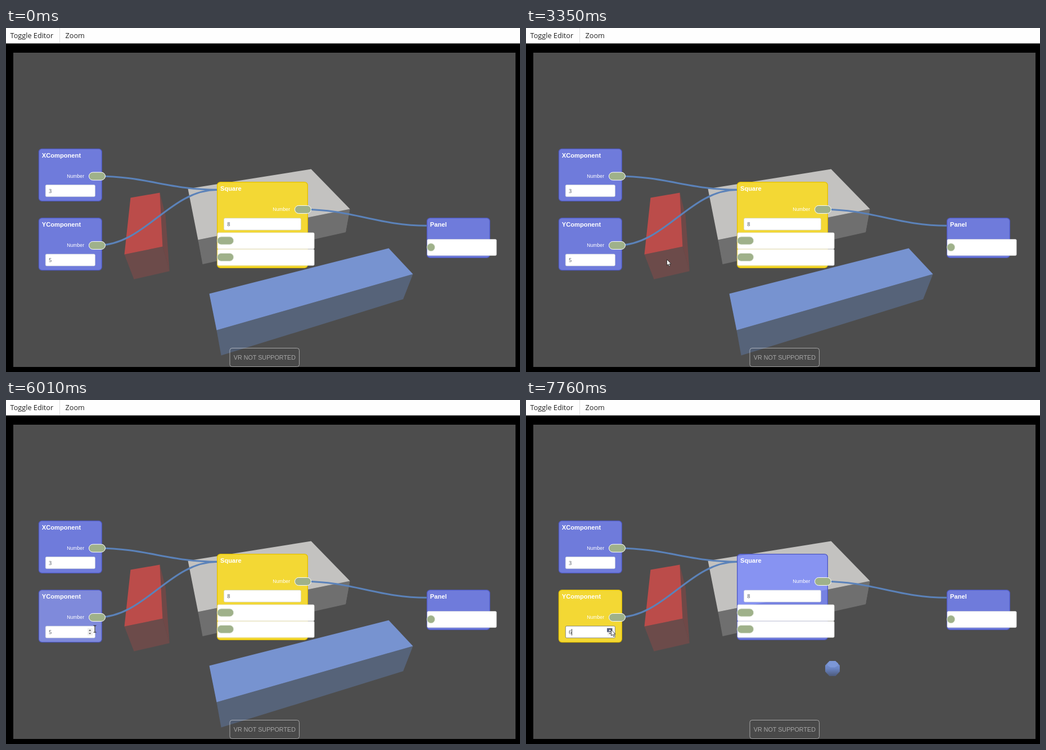
Recreate the animation shown at these times as an HTML page. Size 914 by 613 pixels, loop 8 s.

```html
<!DOCTYPE html>
<html lang="en">
<head>
<meta charset="utf-8">
<title>Node editor</title>
<style>
html, body { margin: 0; width: 100%; height: 100%; overflow: hidden; background: #000; }
svg { display: block; width: 914px; height: 613px; }
.bar { font: 12.7px "Open Sans", sans-serif; fill: #222; }
.title { font: bold 11.16px "Liberation Sans", Arial, sans-serif; fill: #fff; }
.label { font: 8.68px "Liberation Sans", Arial, sans-serif; fill: #fff; }
.value { font: 9.3px "Open Sans", sans-serif; fill: #495057; }
.vr { font: 10.75px "Liberation Sans", Arial, sans-serif; fill: #fff; }
.node { fill: rgba(120,136,255,.8); stroke: #4e58bf; stroke-width: 1.3; }
.node.hover { fill: rgba(140,154,255,.8); }
.node.picked { fill: #f3d834; stroke: #e3c000; }
.wire { fill: none; stroke: #5b82b9; stroke-width: 3.1; }
</style>
</head>
<body>
<svg id="stage" viewBox="0 0 914 613" xmlns="http://www.w3.org/2000/svg"></svg>
<script>
const LOOP = 8000, ENTER = 430, HOVER = 4290, FIELD = 5630, SPIN = 6840, CLICK = 7500, CHANGE = 7760;

const $ = id => document.getElementById(id);
const show = (id, on) => $(id).setAttribute('display', on ? 'inline' : 'none');
const rect = (x, y, w, h, r, attrs) =>
  `<rect x="${x}" y="${y}" width="${w}" height="${h}" rx="${r}" ${attrs}/>`;
const text = (x, y, cls, s, attrs = '') =>
  `<text x="${x}" y="${y}" class="${cls}" ${attrs}>${s}</text>`;
const poly = (points, fill) => `<polygon points="${points.join(' ')}" fill="${fill}"/>`;

// Vertical edges of every block converge on one point far below the stage.
const nadir = [472, 1084];
const drop = p => {
  const k = .0125 + .00013 * p[1];
  return p.map((v, i) => v + k * (nadir[i] - v));
};
// Corners of the top face: back left, back right, front right, front left.
const block = (a, b, c, d, top, front, side) =>
  poly([b, drop(b), drop(c), c], side) +
  poly([d, c, drop(c), drop(d)], front) +
  poly([a, b, c, d], top);

const ring = (cx, cy, rx, ry, n = 8) => Array.from({ length: n }, (_, i) => {
  const a = (i + .5) / n * 2 * Math.PI;
  return [cx + rx * Math.cos(a), cy + ry * Math.sin(a)];
});

// Editor parts, all placed relative to their node's corner.
const socket = (x, y, w, edge) =>
  rect(x + .5, y + .5, w - 1, 14, 7, `fill="#9fb18a" stroke="${edge}"`);
const slot = (n, dy, w) =>
  rect(n.x + 1, n.y + dy, n.w + 10.2, 29, 2, 'fill="#fff" stroke="#d5d5d0" stroke-width=".5"') +
  socket(n.x + .2, n.y + dy + 6.7, w, '#dfe6d8');
const control = n =>
  text(n.x + n.w - 62.8, n.y + 52.2, 'label', 'Number') +
  socket(n.x + n.w - 24, n.y + 41.9, 30, '#fff') +
  rect(n.x + 12.6, n.y + 64.9, n.w - 25.2, 21, 2,
    `id="${n.id}Box" fill="#fff" stroke="#ced4da" stroke-width=".7"`) +
  text(n.x + 18.3, n.y + 79, 'value', n.value, `id="${n.id}Text"`);
const node = n =>
  rect(n.x + .65, n.y + .65, n.w - 1.3, n.h - 1.3, 5.6, `id="${n.id}" class="node"`) +
  text(n.x + 6, n.y + 15.8, 'title', n.name) +
  (n.value ? control(n) : '');
const wire = (a, b) => {
  const x1 = a.x + a.w - 9, y1 = a.y + 49.3, x2 = b.x + 1, y2 = b.y + 14.3;
  const h = (x2 - x1) * .4;
  return `<path class="wire" d="M${x1} ${y1}C${x1 + h} ${y1} ${x2 - h} ${y2} ${x2} ${y2}"/>`;
};

const xNode = { id: 'x', x: 57.7, y: 214.7, w: 113.3, h: 94.3, name: 'XComponent', value: 3 };
const yNode = { ...xNode, id: 'y', y: 338, name: 'YComponent', value: 5 };
const square = { id: 'square', x: 375, y: 274, w: 162, h: 154, name: 'Square', value: 8 };
const panel = { id: 'panel', x: 748, y: 338, w: 113, h: 72, name: 'Panel' };

const header =
  rect(0, 0, 914, 27.5, 0, 'fill="#fefefe"') +
  rect(95, 0, 1, 27, 0, 'fill="#dcdcdc"') +
  text(7.5, 17.5, 'bar', 'Toggle Editor') + text(105.5, 17.5, 'bar', 'Zoom');

const scene =
  rect(13, 44, 893, 560, 0, 'fill="#4d4d4d"') +
  '<g transform="translate(.5 .5)">' +
  block([221, 302], [273, 293], [278, 389], [210, 403], '#bb4c4a', '#6c4b4a', '#6f4847') +
  block([323, 286], [542, 251], [611, 322], [341, 377], '#c3c2c0', '#6f6f6f', '#6f6f6f') +
  '<g id="slab">' +
  block([361, 473], [680, 392], [723, 438], [374, 538], '#7793d0', '#566379', '#566379') +
  '</g></g><g id="ball">' +
  poly(ring(545, 478.5, 14, 14.5), 'url(#shade)') +
  poly(ring(545.5, 471, 10, 6), '#7c97d6') + '</g>' +
  '<g opacity=".5">' +
  rect(398, 570.5, 123.5, 33, 4, 'fill="#000" fill-opacity=".1" stroke="#fff"') +
  text(404.8, 590.6, 'vr', 'VR NOT SUPPORTED') + '</g>';

const editor =
  wire(xNode, square) + wire(yNode, square) + wire(square, panel) +
  [xNode, yNode, square, panel].map(node).join('') +
  slot(square, 90.7, 30) + slot(square, 120.2, 30) + slot(panel, 38.5, 15);

const extras =
  '<g id="spin">' + rect(145, 406.5, 9, 13, 0, 'fill="#efefef"') +
  rect(144, 406.5, 9.5, 7, 0, 'id="spinUp" fill="#59627f"') +
  '<path id="up" d="M147 411.6l2.2-2.5 2.2 2.5z"/>' +
  '<path d="M147 415l2.2 2.5 2.2-2.5z" fill="#666"/></g>' +
  rect(81, 408, .9, 11.5, 0, 'id="caret" fill="#222"') +
  '<g id="pointer">' +
  '<path id="arrow" d="M.5 .5V11L3 8.8 4.6 12.6 6.4 11.8 4.8 8.2H8Z" fill="#fff" stroke="#1c1c1c" stroke-width=".8"/>' +
  '<path id="hand" d="M-1.3 7V1Q0-.8 1.3 1V5Q4 4 5.6 6 7 5.6 7 7V10.5L5.8 14H.2L-3 9.5Q-3.2 7.6-1.3 9Z" fill="#fff" stroke="#222" stroke-width=".7"/>' +
  '<path id="beam" d="M-2.5-6H2.5M0-6V6M-2.5 6H2.5" fill="none" stroke="#222" stroke-width="1.1"/></g>' +
  '<circle id="press" cx="151" cy="409" r="9.7" fill="#f2e62a" opacity=".82"/>';

$('stage').innerHTML =
  '<defs><linearGradient id="shade" x2="0" y2="1"><stop stop-color="#7c97d6"/>' +
  '<stop offset=".5" stop-color="#6a84c2"/><stop offset="1" stop-color="#4d5b7c"/></linearGradient></defs>' +
  header + scene + editor + extras;

// The pointer glides through these: time, x, y.
const route = [
  [ENTER, 852, 607], [740, 728, 565], [1450, 649, 545], [2000, 558, 539],
  [2630, 412, 469], [3010, 271, 409], [3350, 250, 412], [3940, 188, 392],
  [HOVER, 169, 397], [5370, 164, 407], [SPIN, 151, 409]
];

function pointerAt(t) {
  const next = route.findIndex(p => p[0] > t);
  if (next < 0) return route[route.length - 1].slice(1);
  const a = route[Math.max(next - 1, 0)], b = route[next];
  const k = Math.max(0, (t - a[0]) / (b[0] - a[0] || 1));
  return [1, 2].map(i => Math.round(a[i] + (b[i] - a[i]) * k));
}

function draw(t) {
  const done = t >= CHANGE;
  const hand = t >= HOVER && t < FIELD;
  const beam = t >= FIELD && t < SPIN;
  $('pointer').setAttribute('transform', `translate(${pointerAt(t)})`);
  show('pointer', t >= ENTER);
  show('hand', hand);
  show('beam', beam);
  show('arrow', !hand && !beam);
  show('spin', t >= FIELD);
  show('spinUp', done);
  show('press', t >= CLICK && !done);
  show('caret', done);
  show('slab', !done);
  show('ball', done);
  $('up').setAttribute('fill', done ? '#fff' : '#555');
  $('y').setAttribute('class', 'node' + (done ? ' picked' : t >= HOVER ? ' hover' : ''));
  $('square').setAttribute('class', 'node' + (done ? '' : ' picked'));
  $('yText').textContent = yNode.value + done;
  $('yBox').setAttribute('stroke', done ? '#5b6076' : '#ced4da');
}

const start = performance.now();
function tick() {
  draw((performance.now() - start) % LOOP);
  requestAnimationFrame(tick);
}
tick();
</script>
</body>
</html>
```
